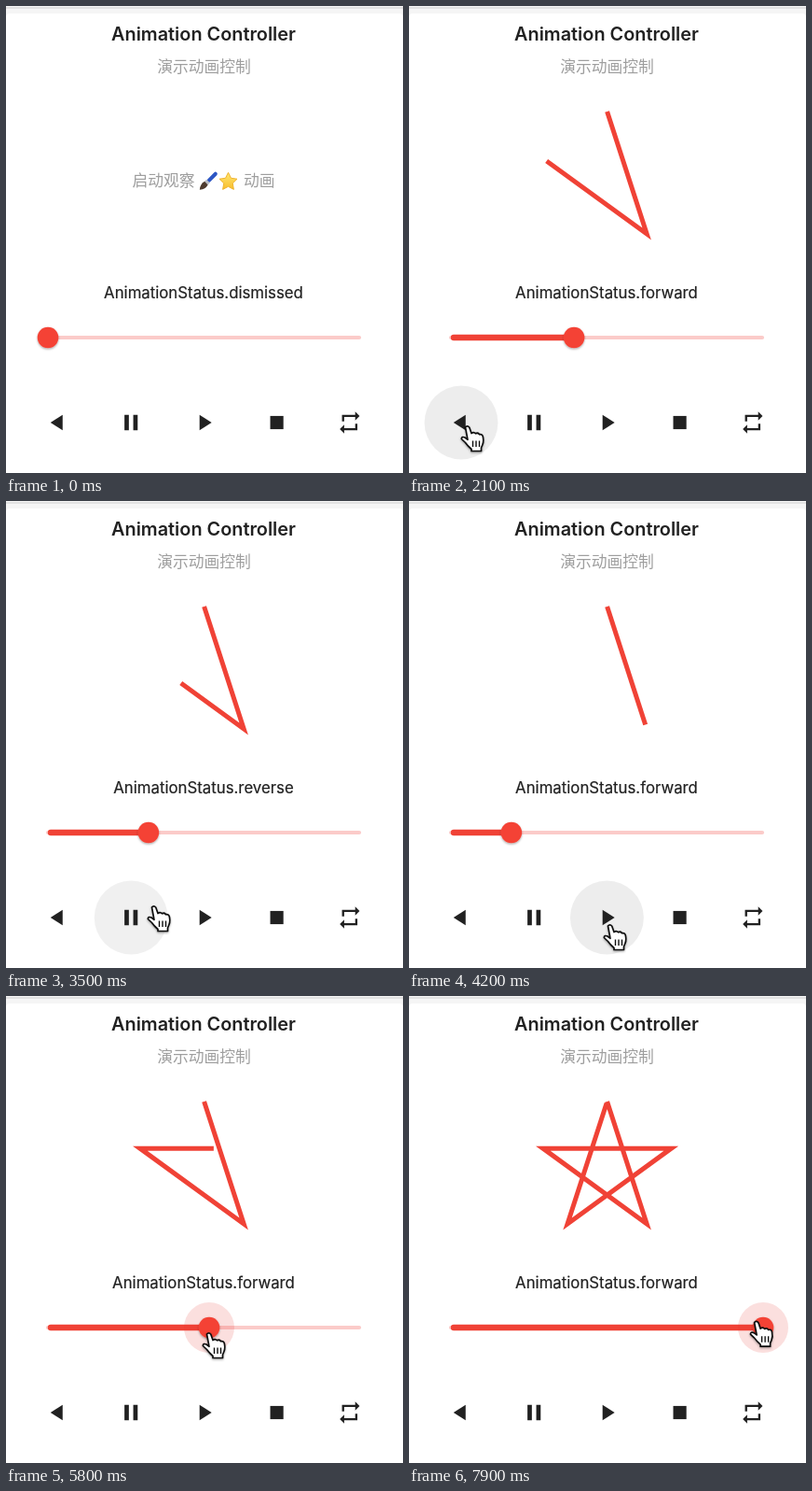
Recreate the animation shown at these times as an HTML page. Size 426 by 500 pixels, loop 8 s.

```html
<!DOCTYPE html>
<html lang="zh">
<head>
<meta charset="utf-8">
<style>
html, body { margin: 0; width: 100%; height: 100%; overflow: hidden; background: #fff; }
svg { display: block; width: 100vw; height: 100vh; }
text { font-family: Inter, sans-serif; fill: #212121; }
.mid { text-anchor: middle; }
.grey { fill: #9e9e9e; font: 500 16.8px "Noto Sans CJK SC", "Noto Sans CJK", sans-serif; }
</style>
</head>
<body>
<svg viewBox="0 0 426 500">
  <defs>
    <filter id="soft" x="-50%" y="-50%" width="200%" height="200%">
      <feDropShadow dx="0" dy="1.2" stdDeviation="1.1" flood-opacity=".35"/>
    </filter>
    <linearGradient id="gold" x1="0" y1="0" x2="0" y2="1">
      <stop offset="0" stop-color="#ffe873"/><stop offset="1" stop-color="#f8bd2c"/>
    </linearGradient>
  </defs>

  <rect width="426" height="500" fill="#f5f5f5"/>
  <rect y="1" width="426" height="2" fill="#e2e2e2"/>
  <rect y="8" width="426" height="510" rx="4" fill="#fff"/>

  <text class="mid" x="212" y="37" font-size="19.85" font-weight="600">Animation Controller</text>
  <text class="grey mid" x="212.5" y="71">演示动画控制</text>

  <g id="hint">
    <text class="grey" x="135.5" y="193">启动观察</text>
    <text class="grey" x="255" y="193">动画</text>
    <g transform="translate(217 187.500) rotate(45)">
      <rect x="-2" y="-13" width="4" height="14" rx="2" fill="#2c56c4"/>
      <rect x="-2.500" y="0" width="5" height="3" fill="#b9bcc4"/>
      <path d="M-2.500 3H2.500Q4 8 0 13Q-4 8 -2.500 3Z" fill="#4d3a2e"/>
    </g>
    <path id="badge" fill="url(#gold)" stroke="#f0b42e" stroke-linejoin="round"/>
  </g>

  <polyline id="star" fill="none" stroke="#f04236" stroke-width="5"/>
  <text id="status" class="mid" x="212" y="313" font-size="16.8" stroke="#212121" stroke-width=".2"></text>

  <path d="M45 355H379" stroke="#fbcbc9" stroke-width="4.200" stroke-linecap="round"/>
  <path id="track" stroke="#f04236" stroke-width="6.400" stroke-linecap="round"/>
  <circle id="halo" cy="355" r="27" fill="#e53935" fill-opacity=".16"/>
  <circle id="thumb" cy="355" r="11.300" fill="#f44336" filter="url(#soft)"/>

  <g id="buttons" fill="#212121"></g>

  <g id="hand" filter="url(#soft)">
    <path d="M5.500 3Q7.500 .5 9.800 3.200L12 9.500Q14.500 7.500 16.500 9.800Q19 8.300 20.600 10.800Q23.500 10 24.300 13Q25.500 18 23.800 22L22.500 25V28.500H12V26.500Q8 23 5.500 19.500L1.300 15.500Q1.500 12.500 5 14L8 16.300Z"
      fill="#fff" stroke="#111" stroke-width="1.700" stroke-linejoin="round"/>
    <path d="M13.500 17.500V24M17 17.500V24M20.500 17.500V24" stroke="#111" stroke-width="1.400"/>
  </g>
</svg>

<script>
const LOOP = 8000, STEP = 100, RUN = 3000;
const LEFT = 45, WIDTH = 336, SLIDER_Y = 355, BUTTON_Y = 446;
const PLAY = 921, BACK = 2692, AGAIN = 4042, PAUSE = 4800, DRAG = 5500;

const $ = id => document.getElementById(id);
const clamp = v => Math.max(0, Math.min(1, v));
const mix = (a, b, f) => a + (b - a) * f;
const ease = f => f * f * (3 - 2 * f);
const set = (el, attrs) => { for (const k in attrs) el.setAttribute(k, attrs[k]); };

const ring = (cx, cy, r, turn) => {
  const a = turn * 2 * Math.PI;
  return [cx + r * Math.sin(a), cy - r * Math.cos(a)];
};
// Every second corner of a pentagon gives the five-stroke star.
const corner = i => ring(212.6, 185.5, 72.4, i * 2 / 5);

set($('badge'), { d: 'M' + Array.from({ length: 10 }, (_, i) =>
  ring(238.5, 188.3, i % 2 ? 5 : 10, i / 10)).join('L') + 'Z' });

const icons = [
  'M16 5v14L5 12z',
  'M6 19h4V5H6zM14 5v14h4V5z',
  'M8 5v14l11-7z',
  'M6 6h12v12H6z',
  'M7 7h10v3l4-4-4-4v3H5v6h2zM17 17H7v-3l-4 4 4 4v-3h12v-6h-2z'
];
const buttonX = i => 56 + 78.2 * i;
$('buttons').innerHTML = icons.map((d, i) =>
  `<g transform="translate(${buttonX(i)} ${BUTTON_Y})">` +
  `<circle class="hover" r="39.5" fill="#000"/>` +
  `<path transform="scale(1.18) translate(-12 -12)" d="${d}"/></g>`).join('');
const hovers = document.querySelectorAll('.hover');

// Hand moves: start, end, x, y
const moves = [
  [100, 600, 208, 452],    // to play
  [1250, 1750, 55, 448],   // to back
  [3200, 3500, 151, 432],  // past pause
  [3500, 3700, 208, 452],  // to play
  [4250, 4600, 121, 437],  // to pause
  [5000, 5350, 169, 442],
  [5350, 5500, 169, 358],  // grab the thumb
  [5500, 5700, 210, 359],
  [5800, 6300, 237, 358],
  [6300, 7150, 333, 349],
  [7150, 7600, 382, 350],
  [7600, 8000, 362, 346]
];
const hand = t => moves.reduce(([x, y], [from, to, nx, ny]) => {
  const f = ease(clamp((t - from) / (to - from)));
  return [mix(x, nx, f), mix(y, ny, f)];
}, [222, 490]);

const ran = (t, from, to) => Math.max(0, Math.min(t, to) - from) / RUN;

// Plays, reverses and plays again until paused; then the thumb trails the hand.
function progress(t) {
  if (t < DRAG) return ran(t, PLAY, BACK) - ran(t, BACK, AGAIN) + ran(t, AGAIN, PAUSE);
  return clamp((hand(t - STEP)[0] + 8 - LEFT) / WIDTH);
}

function status(t, p) {
  if (p <= 0) return 'dismissed';
  if (p >= 1) return 'completed';
  return t >= BACK && t < AGAIN ? 'reverse' : 'forward';
}

function starPoints(p) {
  const n = Math.min(4, Math.floor(p * 5));
  const [a, b] = [corner(n), corner(n + 1)];
  const points = Array.from({ length: n + 1 }, (_, i) => corner(i));
  return [...points, a.map((v, i) => mix(v, b[i], p * 5 - n))].join(' ');
}

// Hover fades in while the fingertip stays inside the circle.
function hover(t, x, y, r) {
  const over = time => {
    const [hx, hy] = hand(time);
    return time >= 100 && Math.hypot(hx + 7 - x, hy + 2 - y) < r;
  };
  let level = 0;
  for (let age = 0; age < 240 && over(t - age); age += 40) level += 1 / 6;
  return level;
}

function draw(t) {
  const p = progress(t), x = LEFT + WIDTH * p, [hx, hy] = hand(t);
  $('hint').style.display = p > 0 ? 'none' : '';
  $('status').textContent = 'AnimationStatus.' + status(t, p);
  set($('star'), { points: p > 0 ? starPoints(p) : '' });
  set($('track'), { d: p > 0 ? `M48 ${SLIDER_Y}H${x}` : '' });
  set($('thumb'), { cx: x });
  set($('halo'), { cx: x, opacity: clamp((t - DRAG) / 100) });
  hovers.forEach((el, i) => set(el, { opacity: .072 * hover(t, buttonX(i), BUTTON_Y, 39.5) }));
  set($('hand'), { transform: `translate(${hx} ${hy})`, visibility: t < 100 ? 'hidden' : 'visible' });
}

const begin = performance.now();
function tick() {
  const t = (performance.now() - begin) % LOOP;
  draw(Math.floor(t / STEP) * STEP);
  requestAnimationFrame(tick);
}
draw(0);
requestAnimationFrame(tick);
</script>
</body>
</html>
```
